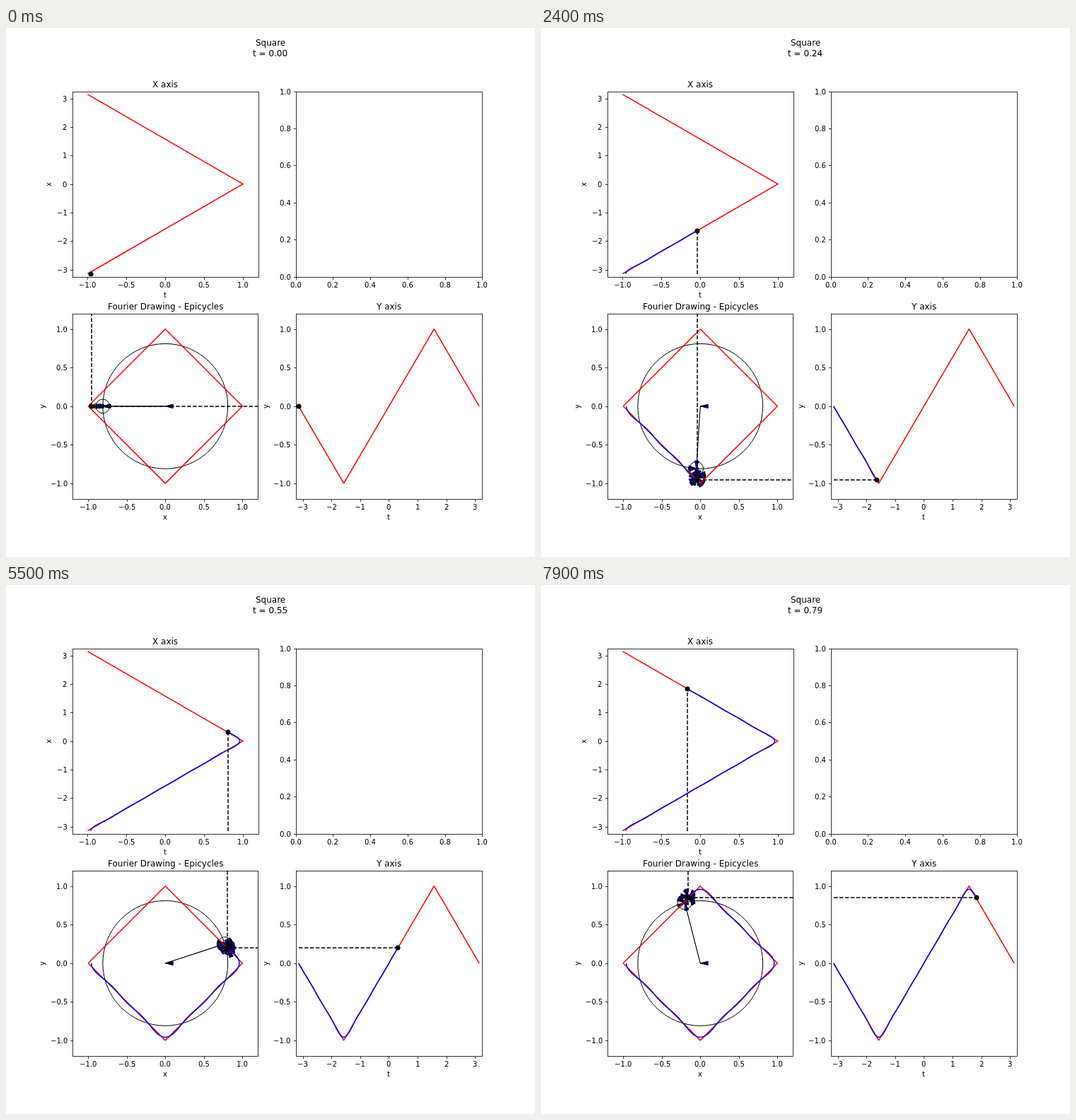
Write an HTML page with a canvas that moves like this. It is 748 by 748 pixels and loops after 8 s.

```html
<!DOCTYPE html>
<html>
<head>
<meta charset="utf-8">
<style>
html, body { margin: 0; width: 100%; height: 100%; overflow: hidden; background: #fff; }
canvas { display: block; }
</style>
</head>
<body>
<canvas id="stage" width="748" height="748"></canvas>
<script>
const ctx = document.getElementById('stage').getContext('2d');
const PI = Math.PI, STEPS = 100, SHOWN = 80, STEP_MS = 100;
const HEAD_LEN = 0.1, HEAD_HALF = 0.025, SHAFT_HALF = 0.0005;
const snap = v => Math.floor(v + 0.5) + 0.5;

function makeAxes(left, top, width, xr, yr, extra) {
  const height = 261.8;
  return {
    left, top, right: left + width, bottom: top + height,
    cx: left + width / 2, cy: top + height / 2,
    px: x => left + (x - xr[0]) / (xr[1] - xr[0]) * width,
    py: y => top + (yr[1] - y) / (yr[1] - yr[0]) * height,
    ...extra
  };
}

const unit = [-1.2, 1.2], turn = [-PI - 0.1, PI + 0.1];
const halves = [-1, -0.5, 0, 0.5, 1], whole = [-3, -2, -1, 0, 1, 2, 3];
const fifths = [0, 0.2, 0.4, 0.6, 0.8, 1];

const xPlot = makeAxes(93.5, 89.76, 263.5, unit, turn,
  { title: 'X axis', xTicks: halves, yTicks: whole, xLabel: 't', yLabel: 'x', yLabelX: 64 });
const blank = makeAxes(409.7, 89.76, 263.5, [0, 1], [0, 1],
  { xTicks: fifths, yTicks: fifths });
const main = makeAxes(94.35, 403.92, 261.8, unit, unit,
  { title: 'Fourier Drawing - Epicycles', xTicks: halves, yTicks: halves, xLabel: 'x', yLabel: 'y', yLabelX: 55 });
const yPlot = makeAxes(409.7, 403.92, 263.5, turn, unit,
  { title: 'Y axis', xTicks: whole, yTicks: halves, xLabel: 't', yLabel: 'y', yLabelX: 371 });

// Fourier terms in the order 0, 1, -1, 2, -2, ...; only 1, -3, 5, -7, 9 have length.
const terms = [0];
for (let k = 1; k <= 10; k++) terms.push(k, -k);
const radius = k => ((k % 4) + 4) % 4 === 1 ? 8 / (PI * PI * k * k) : 0;

function chain(step) {
  let x = 0, y = 0;
  return terms.map(k => {
    const r = radius(k), angle = PI + 2 * PI * k * step / STEPS;
    const link = { x, y, r, angle };
    x += r * Math.cos(angle);
    y += r * Math.sin(angle);
    return { ...link, tipX: x, tipY: y };
  });
}

const trace = Array.from({ length: SHOWN }, (_, i) => {
  const end = chain(i).pop();
  return { x: end.tipX, y: end.tipY, t: -PI + 2 * PI * i / STEPS };
});

function text(str, x, y, size, align = 0.5) {
  ctx.font = size + 'px "DejaVu Sans", sans-serif';
  ctx.fillStyle = '#000';
  ctx.fillText(str, Math.round(x - ctx.measureText(str).width * align), Math.round(y));
}

function path(points, color, width) {
  ctx.beginPath();
  points.forEach(p => ctx.lineTo(p[0], p[1]));
  ctx.strokeStyle = color;
  ctx.lineWidth = width;
  ctx.stroke();
}

const curve = (ax, points, color) =>
  path(points.map(([x, y]) => [ax.px(x), ax.py(y)]), color, 1.5);

function dashed(ax, from, to) {
  ctx.setLineDash([5.55, 2.4]);
  path([from, to].map(([x, y]) => [Math.round(ax.px(x)), Math.round(ax.py(y))]), '#000', 1.5);
  ctx.setLineDash([]);
}

function dot(ax, x, y) {
  ctx.beginPath();
  ctx.arc(Math.round(ax.px(x)), Math.round(ax.py(y)), 3.5, 0, 2 * PI);
  ctx.fillStyle = '#000';
  ctx.fill();
}

function clipped(ax, draw) {
  ctx.save();
  ctx.beginPath();
  ctx.rect(ax.left, ax.top, ax.right - ax.left, ax.bottom - ax.top);
  ctx.clip();
  ctx.lineJoin = 'round';
  draw(ax);
  ctx.restore();
}

function frame(ax) {
  const l = snap(ax.left), r = snap(ax.right), t = snap(ax.top), b = snap(ax.bottom);
  ctx.strokeStyle = '#000';
  ctx.lineWidth = 0.8;
  ctx.strokeRect(l, t, r - l, b - t);
  const decimals = ax.xTicks === whole ? 0 : 1, yDecimals = ax.yTicks === whole ? 0 : 1;
  const label = (v, d) => v.toFixed(d).replace('-', '\u2212');
  for (const v of ax.xTicks) {
    const x = ax.px(v);
    path([[snap(x), b], [snap(x), b + 3.5]], '#000', 0.8);
    text(label(v, decimals), x, ax.bottom + 15, 10);
  }
  for (const v of ax.yTicks) {
    const y = ax.py(v);
    path([[l, snap(y)], [l - 3.5, snap(y)]], '#000', 0.8);
    text(label(v, yDecimals), ax.left - 7, y + 4, 10, 1);
  }
  if (!ax.title) return;
  text(ax.title, ax.cx, ax.top - 6, 12);
  text(ax.xLabel, ax.cx, ax.bottom + 29, 10);
  ctx.save();
  ctx.translate(ax.yLabelX, Math.round(ax.cy));
  ctx.rotate(-PI / 2);
  text(ax.yLabel, 0, 0, 10);
  ctx.restore();
}

function epicycle(ax, link) {
  const scale = ax.px(1) - ax.px(0);
  ctx.strokeStyle = '#000';
  ctx.lineWidth = 1;
  ctx.beginPath();
  ctx.arc(ax.px(link.x), ax.py(link.y), link.r * scale, 0, 2 * PI);
  ctx.stroke();

  ctx.save();
  ctx.translate(ax.px(link.tipX), ax.py(link.tipY));
  ctx.rotate(-link.angle);
  ctx.lineJoin = 'miter';
  ctx.miterLimit = 4;
  ctx.beginPath();
  [[0, 0], [-HEAD_LEN, -HEAD_HALF], [-HEAD_LEN, -SHAFT_HALF], [-link.r, -SHAFT_HALF],
   [-link.r, SHAFT_HALF], [-HEAD_LEN, SHAFT_HALF], [-HEAD_LEN, HEAD_HALF]]
    .forEach(([x, y]) => ctx.lineTo(x * scale, y * scale));
  ctx.closePath();
  ctx.fillStyle = '#00f';
  ctx.fill();
  ctx.stroke();
  ctx.restore();
}

function render(step) {
  const past = trace.slice(0, step + 1), { x, y, t } = trace[step];
  ctx.fillStyle = '#fff';
  ctx.fillRect(0, 0, 748, 748);

  clipped(xPlot, ax => {
    curve(ax, [[-1, -PI], [1, 0], [-1, PI]], '#f00');
    curve(ax, past.map(p => [p.x, p.t]), '#00f');
    dashed(ax, [x, -PI], [x, t]);
    dot(ax, x, t);
  });
  clipped(main, ax => {
    chain(step).forEach(link => epicycle(ax, link));
    curve(ax, [[-1, 0], [0, -1], [1, 0], [0, 1], [-1, 0]], '#f00');
    curve(ax, past.map(p => [p.x, p.y]), '#00f');
    dashed(ax, [x, y], [x, 1.2]);
    dashed(ax, [x, y], [1.2, y]);
    dot(ax, x, y);
  });
  clipped(yPlot, ax => {
    curve(ax, [[-PI, 0], [-PI / 2, -1], [PI / 2, 1], [PI, 0]], '#f00');
    curve(ax, past.map(p => [p.t, p.y]), '#00f');
    dashed(ax, [-PI, y], [t, y]);
    dot(ax, t, y);
  });

  [xPlot, blank, main, yPlot].forEach(frame);
  text('Square', 374, 25, 12);
  text('t = ' + (step / STEPS).toFixed(2), 374, 40.4, 12);
}

function tick() {
  render(Math.floor(performance.now() / STEP_MS) % SHOWN);
  requestAnimationFrame(tick);
}
tick();
</script>
</body>
</html>
```
